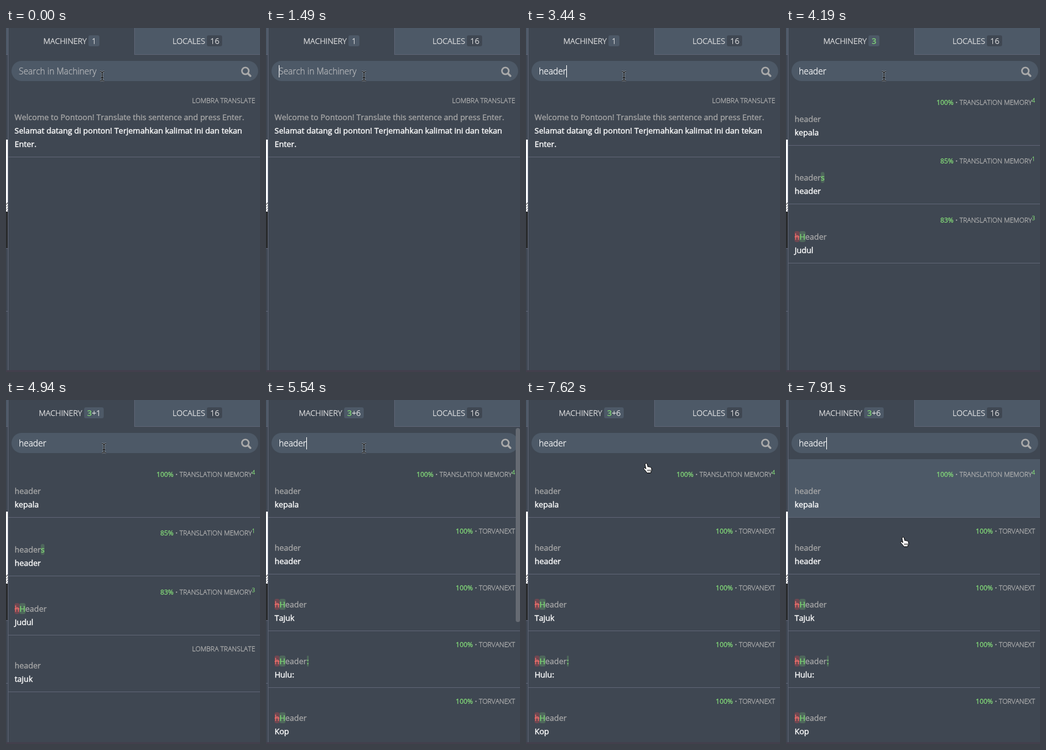
Write an HTML page that moves like this. It is 416 px wide and 564 px high and loops after 8000 ms.

```html
<!DOCTYPE html>
<html lang="en">
<head>
<meta charset="utf-8">
<title>Machinery search</title>
<style>
:root { --panel: #3f4752; --raised: #4d5967; --line: #5e6475; --green: #84dc79; }
html, body { margin: 0; width: 100%; height: 100%; overflow: hidden; background: var(--panel); }
#stage { position: relative; width: 416px; height: 564px; overflow: hidden;
  background: var(--panel); color: #aaa; font: 13px/22px "Open Sans", sans-serif;
  font-kerning: none; -webkit-text-stroke: .3px; }
#stage div, svg { position: absolute; box-sizing: border-box; white-space: pre; }
.edge { left: 0; width: 3px; }
.tab { top: 0; height: 44px; width: 206px; font-weight: 300; text-align: center; color: #ebebeb;
  padding-top: 10px; }
.count { display: inline-block; height: 18px; line-height: 18px; padding: 0 5px; border-radius: 3px;
  background: var(--raised); }
.count:empty { display: none; }
b { font-weight: 400; color: var(--green); }
#search { left: 9px; top: 54px; width: 404px; height: 33px; border-radius: 17px;
  background: var(--raised); padding-left: 12px; font-size: 14px; line-height: 34px; font-weight: 300; }
#typed { color: #fff; }
#hint { color: #b4b6b9; }
#caret { display: inline-block; width: 1px; height: 20px; margin-right: -1px; background: #fff;
  vertical-align: -5px; }
#stage .row { left: 4px; width: 412px; border-bottom: 1px solid var(--line); }
.row.hover { background: var(--raised); }
.label { right: 8px; font-size: 11px; font-weight: 300; color: #b2b2b2; }
sup { font-size: 9px; line-height: 0; vertical-align: 4px; color: var(--green); }
.text { left: 10px; }
.result { left: 10px; color: #fff; -webkit-text-stroke-width: .4px; }
ins, del { border-radius: 3px; }
ins { color: var(--green); background: rgba(123, 200, 118, .25); text-decoration: none; }
del { color: #f0706c; background: rgba(255, 70, 80, .25); }
#bar { left: 409px; top: 46px; width: 7px; height: 318px; border-radius: 4px; background: #666b73; }
svg { left: 0; top: 0; }
</style>
</head>
<body>
<div id="stage">
  <div class="edge" style="top:0;height:44px;background:var(--raised);border-bottom:1px solid var(--line)"></div>
  <div class="edge" style="top:183px;height:118px;background:#fff"></div>
  <div class="edge" style="top:286px;height:14px;background:repeating-linear-gradient(135deg,#fff 0 2px,#777 2px 3px)"></div>
  <div class="edge" style="top:301px;height:61px;background:#292b2d;border-bottom:1px solid var(--line)"></div>
  <div class="edge" style="top:464px;height:1px;background:var(--line)"></div>
  <div style="left:3px;top:0;width:1px;height:564px;background:var(--line)"></div>
  <div class="tab" style="left:4px">MACHINERY <span class="count" id="count"></span></div>
  <div class="tab" style="left:210px;background:var(--raised);border:solid var(--line);border-width:0 0 1px 1px">LOCALES <span class="count" style="background:var(--panel)">16</span></div>
  <div id="search"><span id="typed"></span><span id="caret"></span><span id="hint">Search in Machinery</span></div>
  <div id="list"></div>
  <div id="bar"></div>
  <div style="left:0;top:561px;width:416px;height:3px;background:#433f4c"></div>
  <svg width="416" height="564" fill="none">
    <defs><path id="ibeam" d="M-3.5-7.5q2.5 0 3.5 1.5q1-1.5 3.5-1.5M0-6V6M-3.5 7.5q2.5 0 3.5-1.5q1 1.5 3.5 1.5M-2 2.5H2"/></defs>
    <g stroke="#aaa"><circle cx="392" cy="70.3" r="5.6" stroke-width="2.6"/><path d="M396.2 74.5L400.3 78.6" stroke-width="3.2" stroke-linecap="round"/></g>
    <g id="beam">
      <use href="#ibeam" stroke="#fff" stroke-opacity=".4" stroke-width="2.6"/>
      <use href="#ibeam" stroke="#000" stroke-width="1.1"/>
    </g>
    <g id="hand" stroke="#000">
      <path fill="#fff" d="M4.5 1q1.5-.6 2 1l1 4.5q1.6-.8 2.2.4q1.6-.7 2.2.7q1.6-.2 1.8 1.3q.4 2.5-.6 4.6l-.8 3h-6.2q-1.5-2.6-3-4q-1.6-1.6-2.4-3q0-1.6 1.8-1.2l2 1.6l-1.6-7q0-1.2 1.6-1.9z"/>
      <path d="M7.5 11v3M9.5 11v3M11.5 11v3" stroke-width=".8"/>
    </g>
  </svg>
</div>
<script>
const $ = id => document.getElementById(id);
const LOOP = 8000;

const memory = (percent, n) => `<b>${percent}%</b> • TRANSLATION MEMORY<sup>${n}</sup>`;
const engine = 'LOMBRA TRANSLATE';
const vendor = '<b>100%</b> • TORVANEXT';
const Header = '<del>h</del><ins>H</ins>eader';

// Each row: top, label, source text, translation
const first = [97, memory(100, 4), 'header', 'kepala'];
const matches = [
  first,
  [193, memory(85, 1), 'header<ins>s</ins>', 'header'],
  [290, memory(83, 3), Header, 'Judul']
];
const lists = {
  welcome: [[97, engine, 'Welcome to Pontoon! Translate this sentence and press Enter.',
    'Selamat datang di ponton! Terjemahkan kalimat ini dan tekan\nEnter.']],
  empty: [],
  matches,
  machine: [...matches, [386, engine, 'header', 'tajuk']],
  full: [
    first,
    [193, vendor, 'header', 'header'],
    [286, vendor, Header, 'Tajuk'],
    [379, vendor, Header + '<ins>:</ins>', 'Hulu:'],
    [472, vendor, Header, 'Kop']
  ]
};

// Timelines of [start, value]; each value holds until the next start
const listSteps = [[0, 'welcome'], [3890, 'empty'], [4190, 'matches'], [4790, 'machine'], [5540, 'full']];
const counts = { welcome: '1', empty: '', matches: '<b>3</b>', machine: '<b>3</b>+1', full: '<b>3</b>+6' };
const blinks = [1490, 2090, 2690, 3740, 4340, 4940, 5540, 6130, 6730, 7180, 7770];
const pointer = [
  [0, ['beam', 157.5, 79]], [450, ['beam', 159.5, 79]], [590, ['beam', 160.5, 79]],
  [7470, ['beam', 178.5, 84]], [7620, ['hand', 192, 103]],
  [7770, ['hand', 190, 165]], [7910, ['hand', 187, 224]]
];
const at = (steps, t) => steps.filter(s => s[0] <= t).pop()[1];

function row([top, label, text, result], hover) {
  const pad = label.includes('sup') ? 3 : 0;
  const lines = result.split('\n').length;
  return `<div class="row${hover ? ' hover' : ''}" style="top:${top}px;height:${71 + pad + 22 * lines}px">
    <div class="label" style="top:${11 + pad}px">${label}</div>
    <div class="text" style="top:${38 + pad}px">${text}</div>
    <div class="result" style="top:${60 + pad}px">${result}</div></div>`;
}

let shown;
function draw(t) {
  const name = at(listSteps, t), hover = t >= 7770;
  if (shown !== name + hover) {
    shown = name + hover;
    $('list').innerHTML = lists[name].map((r, i) => row(r, hover && !i)).join('');
    $('count').innerHTML = counts[name];
  }
  const letters = Math.max(0, Math.floor((t - 2690) / 150) + 1);
  $('typed').textContent = 'header'.slice(0, letters);
  $('hint').style.display = letters ? 'none' : '';
  $('caret').style.visibility = blinks.filter(b => b <= t).length % 2 ? 'visible' : 'hidden';
  $('bar').style.display = t >= 5540 && t < 6280 ? '' : 'none';

  const [kind, x, y] = at(pointer, t);
  for (const id of ['beam', 'hand']) $(id).style.display = id === kind ? '' : 'none';
  $(kind).setAttribute('transform', `translate(${x} ${y})`);
}

function tick(now) {
  draw(now % LOOP);
  requestAnimationFrame(tick);
}
draw(0);
requestAnimationFrame(tick);
</script>
</body>
</html>
```
